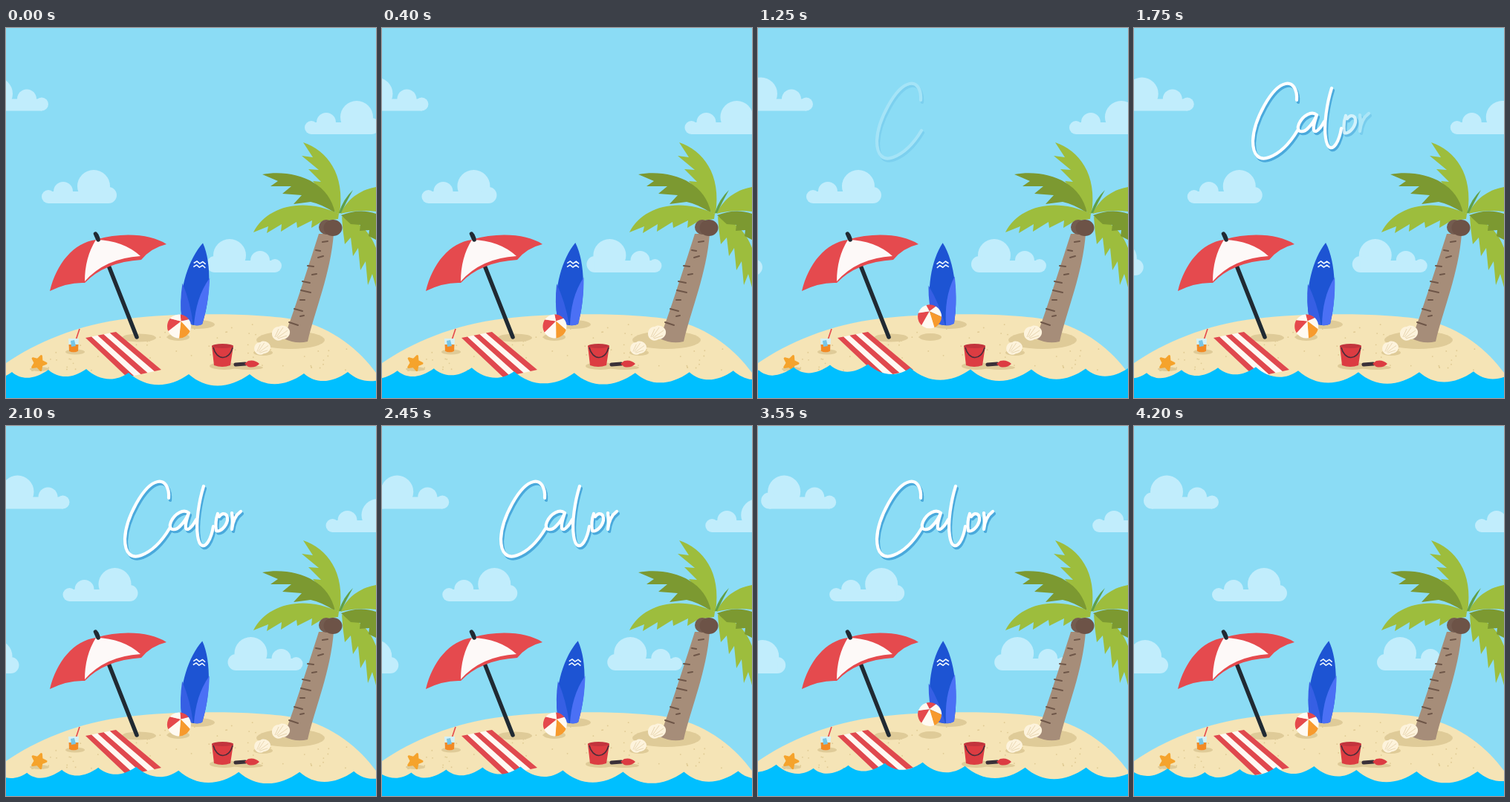
An HTML page that plays this animation: 498x498 px, repeating every 4250 ms.

```html
<!DOCTYPE html>
<html lang="es">
<head>
<meta charset="utf-8">
<title>Calor</title>
<style>
  html, body { margin: 0; width: 100%; height: 100%; overflow: hidden; background: #8bdcf5; }
  svg { display: block; width: 100vw; height: 100vh; }
</style>
</head>
<body>
<svg viewBox="0 0 498 498" role="img" aria-label="Calor">
  <defs>
    <g id="cloud" fill="#c1edfc">
      <circle cx="70" cy="22" r="22"/><circle cx="29" cy="29" r="13"/>
      <circle cx="9" cy="36" r="9"/><circle cx="90" cy="34" r="11"/>
      <rect x="9" y="29" width="81" height="16"/>
    </g>
    <g id="shell">
      <path d="M-11 5C-14-2-10-9-3-9C2-13 11-9 12-3C13 3 8 8 2 8C-2 11-8 10-11 5Z" fill="#fdf3dc"/>
      <path d="M-8 5L-3-6M-6 5L3-8M-5 6L9-4M-4 7L8 3" stroke="#e8d5b0" fill="none"/>
    </g>
    <clipPath id="round"><circle r="16"/></clipPath>
  </defs>

  <rect width="498" height="498" fill="#8bdcf5"/>
  <g id="clouds"></g>

  <path d="M0 451C40 424 95 399 165 391C230 383 340 383 392 393C441 404 476 434 498 464V498H0Z" fill="#f5e4b6"/>
  <g id="grains" fill="#dfca93"></g>
  <g fill="#dfcb98">
    <ellipse cx="179" cy="417" rx="23" ry="5.5"/>
    <ellipse cx="257" cy="399" rx="24" ry="6"/>
    <ellipse cx="232" cy="416" rx="15" ry="5"/>
    <ellipse cx="383" cy="420" rx="46" ry="12"/>
    <ellipse cx="93" cy="436" rx="13" ry="3.5"/>
    <ellipse cx="294" cy="455" rx="20" ry="5"/>
    <ellipse cx="326" cy="457" rx="20" ry="3"/>
    <ellipse cx="45" cy="459" rx="13" ry="3"/>
    <ellipse cx="346" cy="437" rx="13" ry="4"/>
  </g>

  <g id="board">
    <path d="M256 289C239 311 229 352 235 388Q237 397 247 399Q256 402 264 398C272 365 271 316 256 289Z" fill="#1d54d3"/>
    <path d="M233 345Q231 372 236 391Q239 398 247 399L252 400Q246 370 233 345Z" fill="#365fe4"/>
    <path d="M269 335C257 355 253 377 253 400Q260 401 264 398C269 375 270 355 269 335Z" fill="#4b70f5"/>
    <path d="M246 317l4-3 4 3 4-3 4 3M246 322l4-3 4 3 4-3 4 3" fill="none" stroke="#eef8ff" stroke-width="1.6" stroke-linejoin="round"/>
  </g>

  <g id="towel"></g>
  <path d="M122 279L176 416" stroke="#202a33" stroke-width="5.5" stroke-linecap="round"/>
  <path d="M59 354C68 317 91 289 121 285C158 274 196 278 216 291Q195 296 182 312Q133 315 106 343Q83 342 59 354Z" fill="#e54a4e"/>
  <path d="M121 285Q106 309 106 341Q133 310 181 307Q158 286 121 285Z" fill="#fdf9f8"/>
  <path d="M120.500 277L124 285" stroke="#202a33" stroke-width="5.500" stroke-linecap="round"/>

  <g id="ball" clip-path="url(#round)"></g>

  <path d="M94 420L99 405" stroke="#e5484c" stroke-width="1.600"/>
  <path d="M84 418H98L97 435Q91 438 85 435Z" fill="#d3f1f8"/>
  <path d="M84.500 426H97.500L97 435Q91 438 85 435Z" fill="#f28a24"/>
  <path d="M87 421l5-1 2 8-6 1Z" fill="#78c6e6"/>
  <path id="star" fill="#f5a32c" stroke="#f5a32c" stroke-width="3" stroke-linejoin="round"/>

  <path d="M277 428L280 454Q291 458 302 454L306 428Z" fill="#dc3c42"/>
  <ellipse cx="291.500" cy="428" rx="14.500" ry="3" fill="#c2343d"/>
  <path d="M279 430C283 447 300 449 305 430" fill="none" stroke="#4a2e3a" stroke-width="1.600"/>
  <path d="M309 453L322 452" stroke="#3a3038" stroke-width="5" stroke-linecap="round"/>
  <path d="M321 452L326 448Q335 446 341 452Q335 458 326 456Z" fill="#dc3c42"/>

  <path d="M421 277H441C437 330 417 376 406 422Q390 426 374 418C388 380 404 330 421 277Z" fill="#a68d79"/>
  <path d="M426 288l7-1M417 299l6 1M420 309l7-2M406 320l8 1M412 332l6-1M399 341l10 2M397 353l13 3M396 366l6 0M388 378l11 3M381 396l12 4M396 388l5-1" stroke="#6e5648" stroke-width="2" stroke-linecap="round"/>
  <g fill="#9dbd3d">
    <path d="M444 249C429 228 420 215 413 206L424 207L407 190L421 191L398 172L413 174L400 154C432 165 457 196 449 250Z"/>
    <path d="M450 250C462 226 481 217 498 214V247Q473 244 450 250Z"/>
    <path d="M452 254C473 258 490 274 498 296V349L493 331L487 346L484 314L477 326L474 296L467 307L464 282L456 291Q453 272 452 254Z"/>
  </g>
  <path d="M345 197C386 190 434 205 443 249Q425 237 410 234L387 237L398 225L372 223L384 213L356 213L366 206Z" fill="#7c9931"/>
  <path d="M451 252Q476 242 498 250V285L488 280L489 272L476 273L477 265L464 264Z" fill="#7c9931"/>
  <path d="M333 275C351 240 399 227 448 250L447 257L426 260L411 269L412 259L392 269L391 261L370 274L371 264L351 276L353 267Z" fill="#9dbd3d"/>
  <path d="M448 249Q454 230 467 218Q458 234 451 249Z" fill="#62a046"/>
  <ellipse cx="431" cy="268" rx="10" ry="10" fill="#745c50"/>
  <ellipse cx="440" cy="269" rx="12.500" ry="11" fill="#6d5347"/>
  <use href="#shell" x="370" y="411"/>
  <use href="#shell" transform="translate(345 431) scale(.9)"/>

  <path id="sea" fill="#00bfff"/>
  <g id="word" fill="none" stroke-linecap="round" stroke-linejoin="round" stroke-width="4.200"></g>
</svg>

<script>
const LOOP = 4250, STEP = 50, SWAY = 2250;
const $ = id => document.getElementById(id);
const clamp = v => Math.max(0, Math.min(1, v));

// left edge, top, mirrored
const clouds = [[-44, 66.5, 1], [48, 191, 0], [270, 284, 1], [402, 98, 0], [-112, 288, 0]];
$('clouds').innerHTML = clouds.map(([x, y, flip]) =>
  `<use href="#cloud" transform="translate(${flip ? x + 101 : x} ${y}) scale(${flip ? -1 : 1} 1)"/>`).join('');

// Lengthwise stripes across the slanted towel
const stripe = (a, b, color) => {
  const top = k => `${107 + 41 * k} ${417 - 8 * k}`;
  const end = k => `${163 + 46 * k} ${470 - 10 * k}`;
  return `<path d="M${top(a)}L${top(b)}L${end(b)}L${end(a)}Z" fill="${color}"/>`;
};
$('towel').innerHTML = [0, 1, 2, 3, 4].map(i =>
  stripe(i / 5, (i + 1) / 5, i % 2 ? '#fff8f3' : '#e0484e')).join('');

// Six panels meeting at an off-centre pole
const white = '#fffaf2', red = '#e5484c', orange = '#f79a2d';
const rim = a => `${24 * Math.cos(a)} ${24 * Math.sin(a)}`;
$('ball').innerHTML = [red, white, orange, white, red, white].map((color, i) => {
  const a = i * Math.PI / 3 - 1.75, b = a + Math.PI / 3 + .02;
  return `<path d="M1-7L${rim(a)}L${rim(b)}Z" fill="${color}"/>`;
}).join('');

let seed = 7;
const random = () => (seed = seed * 16807 % 2147483647) / 2147483647;
$('grains').innerHTML = Array.from({ length: 75 }, () => {
  const x = 35 + random() * 425;
  const top = 393 + ((x - 280) / 245) ** 2 * 58;
  return `<circle cx="${x}" cy="${top + random() * (462 - top)}" r=".9"/>`;
}).join('');

$('star').setAttribute('d', 'M' + Array.from({ length: 10 }, (_, i) => {
  const r = i % 2 ? 4.8 : 10, a = i * Math.PI / 5 - 1.22;
  return `${44 + r * Math.cos(a)} ${451 + r * Math.sin(a)}`;
}).join('L') + 'Z');

const letters = [
  'M219 97C220 83 214 73 204 75C185 79 161 124 160 152C160 172 169 179 182 174C198 168 211 153 220 138',
  'M246 117C239 111 227 118 222 129C217 141 228 142 235 134Q242 127 246 117C241 132 240 140 245 139Q250 137 256 126',
  'M266 81C260 100 255 130 258 148C260 162 266 165 272 156Q277 148 279 135',
  'M285 118C282 126 282 134 283 141C288 143 296 136 298 127C299 118 292 115 287 122',
  'M304 117Q306 128 304 139Q306 122 316 115'
];
$('word').innerHTML = letters.map(d =>
  `<g><path d="${d}" stroke="#4aa9dc" transform="translate(2 3)"/><path d="${d}" stroke="#fff"/></g>`).join('');

const crests = [[-140, 463], [-89, 462], [-39, 467], [8, 463], [57, 460], [108, 459],
  [165, 464], [246, 466], [328, 466], [401, 465], [460, 463], [520, 465]];

function seaPath(shift, lift) {
  let d = '';
  crests.forEach(([u, v], i) => {
    const x = u + shift, y = v - lift;
    if (!i) { d = `M${x} ${y}`; return; }
    const [pu, pv] = crests[i - 1];
    const w = u - pu, sag = w * .25;
    d += `C${pu + shift + w * .28} ${pv - lift + sag} ${x - w * .35} ${y + sag} ${x} ${y}`;
  });
  return d + 'V500H-150Z';
}

function update(t) {
  const sway = Math.cos(2 * Math.PI * t / SWAY);
  $('clouds').setAttribute('transform', `translate(${t * .01357} 0)`);
  $('sea').setAttribute('d', seaPath(t * .032, 3.3 * (1 - sway)));
  $('board').setAttribute('transform', `rotate(${.3 + 4.4 * sway} 255 399)`);

  const hop = clamp((t % SWAY - 950) / 700);
  const height = 13.5 * Math.sin(Math.PI * hop);
  $('ball').setAttribute('transform',
    `translate(${232 + sway} ${401.5 - height}) rotate(${12 * sway})`);

  [...$('word').children].forEach((letter, i) => {
    const fadeIn = clamp((t - 1170 - 120 * i) / 350);
    const fadeOut = clamp((t - 3650 - 60 * i) / 250);
    letter.setAttribute('opacity', fadeIn * (1 - fadeOut));
  });
}

const start = performance.now();
function frame() {
  const t = (performance.now() - start) % LOOP;
  update(Math.floor(t / STEP) * STEP);
  requestAnimationFrame(frame);
}
frame();
</script>
</body>
</html>
```
